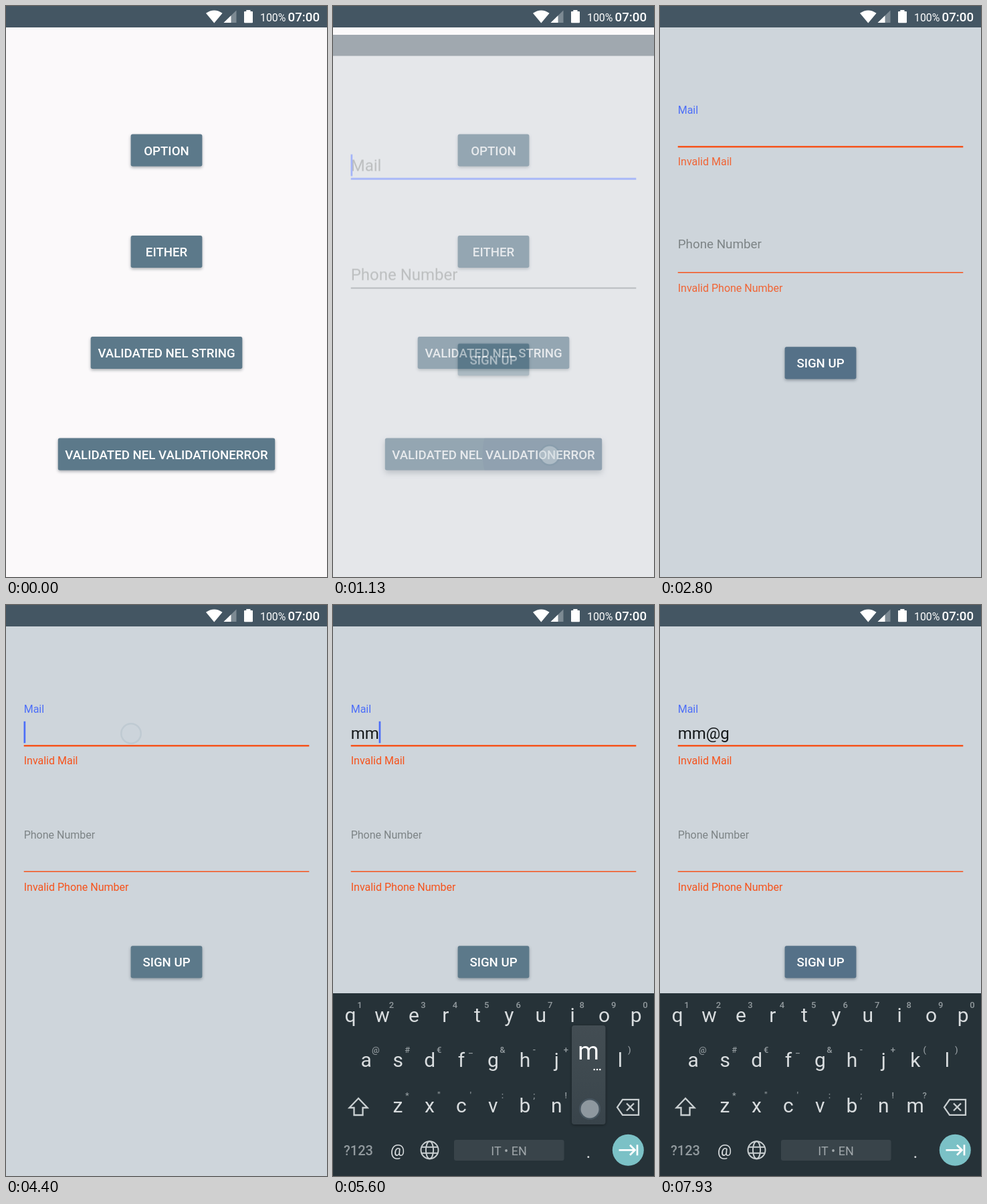
These frames come from a looping animation (480 by 853 pixels, 8000 ms). An HTML page with a canvas:

```html
<!DOCTYPE html>
<html lang="en">
<head>
<meta charset="utf-8">
<title>Sign up form</title>
<style>
html, body { margin: 0; width: 100%; height: 100%; overflow: hidden; background: #fbf9fa; }
canvas { display: block; width: 480px; height: 853px; }
</style>
</head>
<body>
<canvas id="stage" width="480" height="853"></canvas>
<script>
const W = 480, H = 853, LOOP = 8000, STEP = 200 / 3;
const BLUE = '#4c6ef8', ORANGE = '#f6531c', PAGE = '#ced5db', BAR = '#445663';
const stage = document.getElementById('stage').getContext('2d');
const layer = Object.assign(document.createElement('canvas'), { width: W, height: H }).getContext('2d');
let c = stage;

// Moments of the screen changes, in ms
const OPEN = 1102, FLOAT = 1310, ERROR = 2660, KEYS = 4440;

const typed = [
  { key: 'm', x: 382, top: 628, down: 5190, up: 5330, tx: 384, ty: 753 },
  { key: 'm', x: 382, top: 628, down: 5460, up: 5570, tx: 384, ty: 753 },
  { key: '@', x: 97, top: 695, down: 6660, up: 6850, tx: 104, ty: 818 },
  { key: 'g', x: 239, top: 561, down: 7190, up: 7390, tx: 240, ty: 686 }
];
const taps = [
  { tx: 324, ty: 671, down: 990, up: 1090 },
  { tx: 244, ty: 490, down: 2525, up: 2640 },
  { tx: 187, ty: 192, down: 4260, up: 4340 },
  { tx: 244, ty: 537, down: 7660, up: 7760 }
];
const cursorOff = [[1660, 2130], [2660, 3195], [3660, 4130], [4660, 5130], [6060, 6595], [7928, 8000]];

const clamp = v => Math.max(0, Math.min(1, v));
const span = (t, start, ms) => clamp((t - start) / ms);
const decel = (p, n) => 1 - (1 - p) ** n;
const smooth = p => p * p * (3 - 2 * p);
const mix = (a, b, p) => a + (b - a) * p;

function text(s, x, y, size, color, weight = 400, align = 'left') {
  c.font = `${weight} ${size}px Roboto, sans-serif`;
  c.textAlign = align;
  c.fillStyle = color;
  c.fillText(s, x, y);
}

function box(x, y, w, h, color, r = 0) {
  c.fillStyle = color;
  c.beginPath();
  c.roundRect(x, y, w, h, r);
  c.fill();
}

function disc(x, y, r, color) {
  c.fillStyle = color;
  c.beginPath();
  c.arc(x, y, r, 0, 7);
  c.fill();
}

function trace(points, closed) {
  c.beginPath();
  points.forEach(([x, y]) => c.lineTo(x, y));
  if (closed) c.closePath();
}

function stroke(points, closed) {
  trace(points, closed);
  c.stroke();
}

function fillPath(points, color) {
  trace(points, true);
  c.fillStyle = color;
  c.fill();
}

// Draws a group as one translucent sheet
function sheet(alpha, dy, draw) {
  layer.clearRect(0, 0, W, H);
  c = layer;
  draw();
  c = stage;
  c.save();
  c.globalAlpha = alpha;
  c.drawImage(layer.canvas, 0, dy);
  c.restore();
}

function button(label, mid, w, t, tap) {
  const x = 240 - w / 2, y = mid - 24;
  const age = tap ? t - tap.down : -1;
  const lift = age > 0 && age < 230 ? 1 : 0;
  c.save();
  c.shadowColor = 'rgba(30,45,55,.38)';
  c.shadowBlur = 4 + 4 * lift;
  c.shadowOffsetY = 2 + 2 * lift;
  box(x, y, w, 48, '#5c798a', 2.7);
  c.restore();
  if (age > 0 && age < 650) {
    c.save();
    c.beginPath();
    c.roundRect(x, y, w, 48, 2.7);
    c.clip();
    disc(tap.tx, mid, age * 0.7, `rgba(50,72,120,${0.2 * (1 - span(age, 150, 500))})`);
    c.restore();
  }
  text(label, 240, mid + 7, 18.67, '#fff', 500, 'center');
}

function menu(t) {
  box(0, 0, W, H, '#fbf9fa');
  button('OPTION', 215.5, 106.7, t);
  button('EITHER', 367, 106.7, t);
  button('VALIDATED NEL STRING', 518, 226.6, t);
  button('VALIDATED NEL VALIDATIONERROR', 669.5, 324.4, t, taps[0]);
}

function hint(s, y0, y1, p, color) {
  text(s, 26.7, mix(y0, y1, p), mix(24, 16, p), color);
}

function form(t) {
  const bad = t >= ERROR;
  const line = bad ? 210.3 : 215.6;
  const value = typed.filter(k => t >= k.up).map(k => k.key).join('');
  box(0, 0, W, H, PAGE);
  box(0, 0, W, 32, BAR);

  const rise = smooth(span(t, FLOAT, 200));
  hint('Mail', line - 11.6, line - 49.6, rise, rise > 0 ? BLUE : '#7d8486');
  text(value, 26.7, 200, 24, '#14181a');
  const end = 26.7 + c.measureText(value).width;
  box(26.7, line - 1.4, 426.6, 2.7, bad ? ORANGE : BLUE);
  if (!cursorOff.some(([a, b]) => t >= a && t < b)) box(end - 0.2, line - 36.5, 2.7, 32.5, BLUE);

  const phone = bad ? 398.2 : 378.7;
  hint('Phone Number', phone - 11.7, phone - 49.2, smooth(span(t, ERROR + 20, 200)), '#7d8486');
  box(26.7, phone - 0.7, 426.6, 1.4, bad ? ORANGE : '#59626a');

  if (bad) {
    c.save();
    c.globalAlpha = decel(span(t, ERROR, 220), 2);
    text('Invalid Mail', 26.7, 238, 16, ORANGE);
    text('Invalid Phone Number', 26.7, 427, 16, ORANGE);
    c.restore();
  }
  button('SIGN UP', bad ? 533.2 : 485.7, 106.7, t, t < 7000 ? taps[1] : taps[3]);
}

function keyRow(keys, hints, x0, y) {
  [...keys].forEach((k, i) => {
    const x = x0 + i * 47.45;
    text(k, x, y, 30, '#d9dddf', 400, 'center');
    text(hints[i], x + 14, y - 21, 13, '#929a9e', 500, 'center');
  });
}

function keyboard() {
  const ink = '#c9cfd1';
  box(0, 580, W, H - 580, '#263238');
  keyRow('qwertyuiop', '1234567890', 26, 623);
  keyRow('asdfghjkl', '@#€_&-+()', 49.7, 690);
  keyRow('zxcvbnm', '*"\':;!?', 97, 758);
  text('?123', 38, 822, 20, '#929a9e', 500, 'center');
  text('@', 96.5, 823, 24, '#d9dddf', 400, 'center');
  text('.', 382, 826, 26, '#d9dddf', 400, 'center');
  box(181, 799, 164.5, 31, '#39444a', 3);
  text('IT • EN', 263, 821.5, 18, '#a0a7ab', 400, 'center');

  c.strokeStyle = ink;
  c.lineWidth = 2.3;
  stroke([[38, 737], [24.5, 751], [31.5, 751], [31.5, 762], [44.5, 762], [44.5, 751], [51.5, 751]], true);
  stroke([[425, 750.3], [433, 738.8], [457, 738.8], [457, 761.8], [433, 761.8]], true);
  stroke([[439, 744.5], [450, 755.5]]);
  stroke([[450, 744.5], [439, 755.5]]);

  c.lineWidth = 2;
  c.beginPath();
  c.arc(144.5, 814.3, 13, 0, 7);
  c.stroke();
  c.beginPath();
  c.ellipse(144.5, 814.3, 5.6, 13, 0, 0, 7);
  c.stroke();
  stroke([[132.5, 809.8], [156.5, 809.8]]);
  stroke([[132.5, 818.8], [156.5, 818.8]]);

  disc(441.3, 814.3, 23.5, '#7bc1c6');
  c.strokeStyle = '#fff';
  c.lineWidth = 2.7;
  stroke([[427.5, 814.3], [451, 814.3]]);
  stroke([[444, 806.8], [451.5, 814.3], [444, 821.8]]);
  stroke([[455, 806.3], [455, 822.3]]);
}

function popup(k) {
  const tone = c.createLinearGradient(0, k.top, 0, k.top + 148);
  tone.addColorStop(0, '#434d53');
  tone.addColorStop(0.55, '#3e494f');
  tone.addColorStop(1, '#39444b');
  c.save();
  c.shadowColor = 'rgba(0,0,0,.4)';
  c.shadowBlur = 4;
  c.shadowOffsetY = 1;
  box(k.x - 25, k.top, 50.5, k.key === '@' ? 144 : 148, tone, 4);
  c.restore();
  text(k.key, k.x, k.top + 51, 36, '#fff', 400, 'center');
  for (let i = -1; i < 2; i++) disc(k.x + 13 + i * 4.3, k.top + 66, 1.3, '#fff');
}

function touch(p, t) {
  if (t < p.down || t > p.up + 130) return;
  c.save();
  c.globalAlpha = 1 - span(t, p.up, 130);
  disc(p.tx, p.ty, 16, 'rgba(110,140,160,.28)');
  disc(p.tx, p.ty, 13.5, 'rgba(232,237,240,.58)');
  c.restore();
}

function statusBar() {
  box(0, 0, W, 32, BAR);
  c.fillStyle = '#fff';
  c.beginPath();
  c.moveTo(311.3, 25.5);
  c.lineTo(299, 10.8);
  c.quadraticCurveTo(311.3, 2.2, 323.6, 10.8);
  c.fill();
  fillPath([[344.5, 6.5], [344.5, 25], [325.5, 25]], '#7d8a93');
  fillPath([[336.5, 14.3], [336.5, 25], [325.5, 25]], '#fff');
  box(356, 8, 13, 17.3, '#fff', 1);
  box(359.3, 6, 6.2, 3, '#fff');
  text('100%', 380, 22.5, 15.9, '#fff');
  text('07:00', 469, 23, 18.7, '#fff', 500, 'right');
}

function render(time) {
  const t = Math.floor((time % LOOP + 4) / STEP) * STEP;
  const slide = decel(span(t, OPEN, 350), 5);
  const alpha = decel(span(t, OPEN, 200), 4);
  if (alpha < 1) menu(t);
  if (t >= OPEN) sheet(alpha, 68 * (1 - slide), () => form(t));
  if (t >= KEYS) {
    const p = decel(span(t, KEYS, 220), 3);
    sheet(p, 27 * (1 - p), keyboard);
  }
  typed.filter(k => t >= k.down && t < k.up + 75).forEach(popup);
  statusBar();
  [...taps, ...typed].forEach(p => touch(p, t));
}

const start = performance.now();
function tick() {
  render(performance.now() - start);
  requestAnimationFrame(tick);
}
tick();
</script>
</body>
</html>
```
